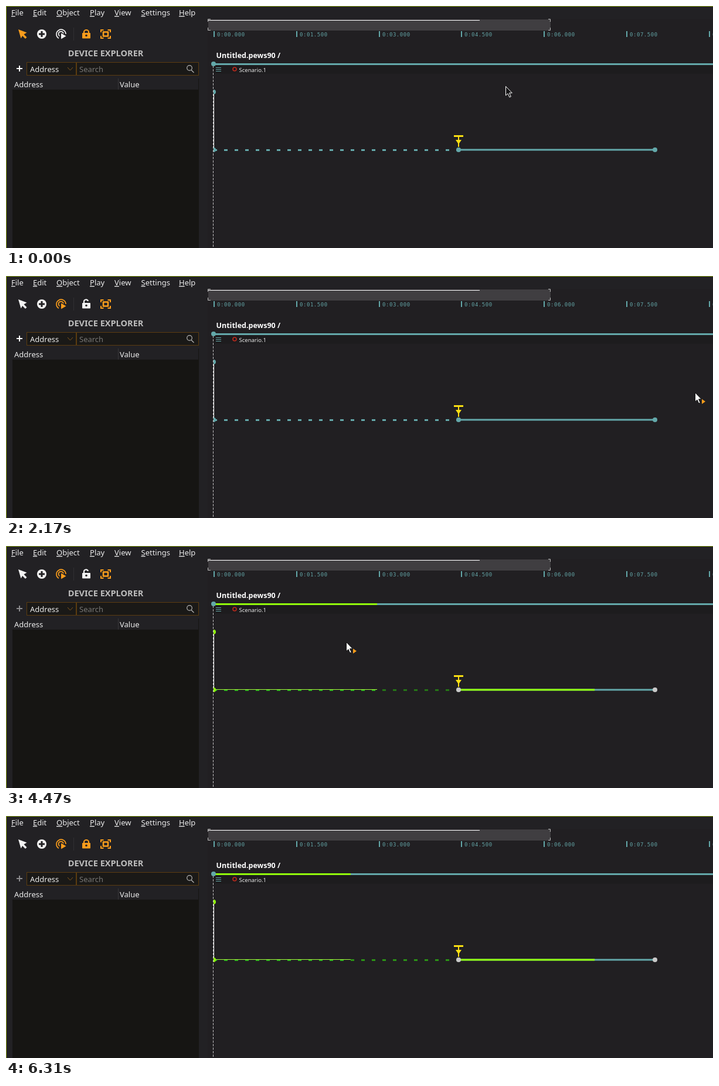
An HTML page for the animation above (6350 ms loop, 1206 by 414 pixels).

```html
<!DOCTYPE html>
<html lang="en">
<head>
<meta charset="utf-8">
<title>Timeline playback</title>
<style>
html, body { margin: 0; width: 100%; height: 100%; overflow: hidden; background: #222124; cursor: none }
svg { display: block }
text { font: 13px "Noto Sans", "Open Sans", sans-serif; fill: #ececec; white-space: pre }
.first { text-decoration: underline }
.title { font-size: 14.5px; font-weight: bold; fill: #bdbdbd }
.file { font-size: 12.5px; font-weight: bold; fill: #fff }
.small { font-size: 9.5px }
.ruler text { font: 9px "DejaVu Sans Mono", monospace; letter-spacing: .55px; fill: #62a3a5 }
.teal { fill: #63a8aa }
</style>
</head>
<body>
<svg id="stage" width="1206" height="414" viewBox="0 0 1206 414">
  <rect x="344" y="22" width="862" height="392" fill="#211f22"/>
  <path d="M0 .5H1206M.5 0V414" stroke="#87a018"/>
  <g id="menu"></g>

  <!-- toolbar -->
  <rect id="hover" fill="#f89c1c"/>
  <path id="select" d="M21 40L35.5 45.5L30.5 48.5L35.5 53.5L33 56L28 51L25.5 55.5Z"/>
  <g id="add">
    <circle cx="61" cy="48" r="8"/>
    <path id="addPlus" d="M56 48H66M61 43V53" stroke-width="3"/>
  </g>
  <g id="play" fill="none" stroke-width="1.7">
    <path d="M90 55.2A8 8 0 1 1 102 48"/>
    <path d="M91.5 51.5A4.3 4.3 0 1 1 98 47"/>
    <path id="playTip" d="M94 46.5L102.5 51.5L94 56.5Z" stroke="none"/>
  </g>
  <path d="M115.5 37V59" stroke="#302f32"/>
  <g id="lock">
    <path id="shackle" fill="none" stroke-width="2.2"/>
    <rect x="130" y="46" width="14" height="9.5" rx="1"/>
    <circle cx="137" cy="50.5" r="1.8" fill="#222124"/>
  </g>
  <g fill="none" stroke="#f89c1c" stroke-width="2">
    <path d="M162 45V41H166.5M173.5 41H178V45M178 51V55H173.5M166.5 55H162V51"/>
    <rect x="166" y="44.5" width="8" height="7" stroke-width="2.6"/>
  </g>

  <!-- device explorer -->
  <text class="title" x="170" y="86" text-anchor="middle">DEVICE EXPLORER</text>
  <path id="plus" d="M18 107H28M23 102V112" stroke-width="2"/>
  <g fill="#1a1917" stroke="#5b3c10">
    <rect x="35.5" y="96.5" width="84" height="22"/>
    <rect x="120.5" y="96.5" width="208" height="22"/>
  </g>
  <text x="41" y="113">Address</text>
  <path d="M105 105L109.5 110L114 105" fill="none" stroke="#80551c"/>
  <text x="125" y="113" style="fill:#777674">Search</text>
  <g fill="none" stroke="#b5b5b5" stroke-width="1.2">
    <circle cx="313" cy="106" r="4.3"/>
    <path d="M316 109.5L320.5 114"/>
  </g>
  <rect x="11" y="124" width="318" height="290" fill="#161513"/>
  <rect x="11" y="124" width="317" height="19" fill="#222124"/>
  <path d="M191.5 124V143" stroke="#38373a"/>
  <text x="14" y="139">Address</text>
  <text x="194" y="139">Value</text>

  <!-- overview and ruler -->
  <rect x="345" y="23" width="584" height="19" fill="#403e41"/>
  <path d="M345 24.5H808" stroke="#fff"/>
  <path d="M349 22.5H344.5V27M925 22.5H928.5V27M928.5 37V41.5H925M349 41.5H344.5V37" fill="none" stroke="#b8b8b8"/>
  <g id="ruler" class="ruler"></g>

  <!-- score -->
  <text class="file" x="358.5" y="89">Untitled.pews90 /</text>
  <rect x="354" y="102" width="852" height="14" fill="#1d1c1e"/>
  <path d="M358 105.5H367M358 108.5H367M358 111.5H367" stroke="#63a8aa"/>
  <circle cx="390" cy="108" r="3" fill="none" stroke="#c02a1c" stroke-width="1.6"/>
  <text class="small" x="397.5" y="113">Scenario.1</text>
  <path d="M353.5 102V414" stroke="#bdbbbd" stroke-dasharray="4 2"/>
  <path d="M354.5 147V246" stroke="#fff"/>
  <rect class="teal" x="354" y="98" width="852" height="3"/>
  <rect id="topBar" x="354" y="98" height="3" fill="#92fb0b"/>
  <circle class="teal" cx="354" cy="99" r="4"/>
  <path id="wait" d="M354 246.5H772" stroke-width="3" stroke-dasharray="6 12"/>
  <path id="passed" stroke="#2fae1e" stroke-width="3" stroke-dasharray="6 12"/>
  <rect id="thin" x="354" y="245" height="1" fill="#a0ff3c"/>
  <rect class="teal" x="772" y="244.5" width="335" height="3"/>
  <rect id="lowBar" x="772" y="244.5" height="3" fill="#92fb0b"/>
  <path id="starts" d="M354 143A4 4 0 0 1 354 151ZM354 242A4 4 0 0 1 354 250Z"/>
  <circle id="dotA" cx="772" cy="246" r="4"/>
  <circle id="dotB" cx="1107" cy="246" r="4"/>
  <path d="M764 221H780V224H773V229H777L773 235V241H771V235L767 229H771V224H764Z" fill="#fbdf12"/>

  <g id="cursor">
    <path id="arrow" d="M.5 .5V16L4 12.8L6.8 19L9.3 18L6.6 11.8H11.3Z"/>
    <path id="badge" d="M12 11.5L18 15.7L12 20Z" fill="#f89c1c"/>
  </g>
</svg>
<script>
const LOOP = 6350, SPEED = 140.8 / 1500;
const ORANGE = '#f89c1c', WHITE = '#f2f2f2', DARK = '#222124', BLACK = '#111';
const TEAL = '#63a8aa', GREEN = '#92fb0b', GREY = '#c9c9c9';
const $ = id => document.getElementById(id);
const set = (id, attrs) => { for (const k in attrs) $(id).setAttribute(k, attrs[k]); };

$('menu').innerHTML = Object.entries({ File: 9, Edit: 46, Object: 86, Play: 143, View: 185, Settings: 230.5, Help: 295 })
  .map(([s, x]) => `<text x="${x}" y="16"><tspan class="first">${s[0]}</tspan>${s.slice(1)}</text>`).join('');

for (let i = 0; i < 7; i++) {
  const x = Math.round(354 + i * 140.8), s = i * 1.5;
  $('ruler').innerHTML += `<rect class="teal" x="${x}" y="43" width="2" height="10"/>` +
    `<text x="${x + 6}" y="52">0:0${s.toFixed(3)}</text>`;
}

// pointer path: time, x, y
const path = [
  [0, 852, 137], [30, 852, 137], [110, 964, 163], [430, 33, 50], [600, 33, 50],
  [830, 72, 52], [950, 97, 54], [1030, 97, 54], [1230, 219, 66], [1270, 219, 66],
  [1630, 954, 167], [1900, 1098, 189], [1940, 1098, 189], [2170, 1175, 199], [2340, 1175, 199],
  [2800, 918, 161], [3340, 918, 161], [3800, 640, 153], [3970, 614, 157], [4215, 609, 160],
  [4600, 560, 165], [5110, 473, 162], [5310, 476, 164], [5880, 490, 430], [LOOP, 490, 430]
];
// clicks that move the play head: time, x
const clicks = [[2340, 1175], [3340, 922], [4215, 609], [5140, 478]];

const slope = (i, k) => path[i + 1] ? (path[i + 1][k] - path[i][k]) / (path[i + 1][0] - path[i][0]) : 0;
const tangent = (i, k) => {
  const a = i ? slope(i - 1, k) : 0, b = slope(i, k);
  return a * b > 0 ? 2 * a * b / (a + b) : 0;
};

// monotone cubic interpolation of one coordinate
function pointer(t, k) {
  let i = 0;
  while (i < path.length - 2 && t >= path[i + 1][0]) i++;
  const d = path[i + 1][0] - path[i][0], u = (t - path[i][0]) / d, v = 1 - u;
  return path[i][k] * v * v * (1 + 2 * u) + path[i + 1][k] * u * u * (3 - 2 * u)
    + d * u * v * (tangent(i, k) * v - tangent(i + 1, k) * u);
}

function headAt(t) {
  const last = clicks.filter(c => t >= c[0]).pop();
  return last ? last[1] + (t - last[0]) * SPEED : 0;
}

function toolbar(t, x, y) {
  const playing = t < 30 ? false : t >= 1000;
  const over = (a, b) => y > 35 && y < 61 && x >= a && x < b;
  const on = over(14, 42) ? 'select' : over(49, 73) ? 'add' : over(83, 106) ? 'play' : '';
  const [hx, hy, w, h] = { select: [14, 35, 28, 26], add: [50, 37, 22, 22], play: [83, 37, 22, 22] }[on] || [0, 0, 0, 0];
  set('hover', { x: hx, y: hy, width: w, height: h });
  const tint = (id, active) => on === id ? BLACK : active ? ORANGE : WHITE;
  set('select', { fill: tint('select', !playing) });
  set('add', { fill: tint('add', false) });
  set('addPlus', { stroke: on === 'add' ? ORANGE : DARK });
  set('play', { stroke: tint('play', playing) });
  set('playTip', { fill: tint('play', playing) });

  const locked = t < 100 || t >= 5900, color = locked ? ORANGE : WHITE;
  set('lock', { fill: color, stroke: 'none' });
  set('shackle', { stroke: color, d: locked ? 'M133 47V44.5A4 3.5 0 0 1 141 44.5V47' : 'M133 47V44A3.5 3 0 0 1 140 43' });

  set('cursor', { transform: `translate(${Math.round(x)} ${Math.round(y)})` });
  set('arrow', { fill: playing ? '#fff' : '#151416', stroke: playing ? '#111' : '#fff' });
  set('badge', { visibility: playing ? 'visible' : 'hidden' });
}

function score(t) {
  const head = headAt(t), playing = head > 0;
  const second = t >= clicks[1][0], waiting = t >= clicks[2][0];
  set('plus', { stroke: playing ? '#8c8b8d' : '#fff' });
  set('topBar', { width: playing ? Math.min(head, 1206) - 354 : 0 });
  set('lowBar', { width: second ? headAt(Math.min(t, clicks[2][0] - .01)) - 772 : 0 });
  set('starts', { fill: playing ? GREEN : TEAL });
  set('dotA', { fill: waiting ? GREY : playing ? GREEN : TEAL });
  set('dotB', { fill: second ? GREY : playing ? GREEN : TEAL });

  const pulse = Math.sin(2 * Math.PI * (t / 1000 + .21));
  set('wait', { stroke: waiting ? `rgb(${44 + 8 * pulse},${152 + 38 * pulse},22)` : TEAL });
  set('passed', { d: waiting ? `M354 246.5H${head}` : '' });
  set('thin', { width: waiting ? head - 354 : 0 });
}

const start = performance.now();
function draw() {
  const t = (performance.now() - start) % LOOP;
  toolbar(t, pointer(t, 1), pointer(t, 2));
  score(t);
  requestAnimationFrame(draw);
}
draw();
</script>
</body>
</html>
```
